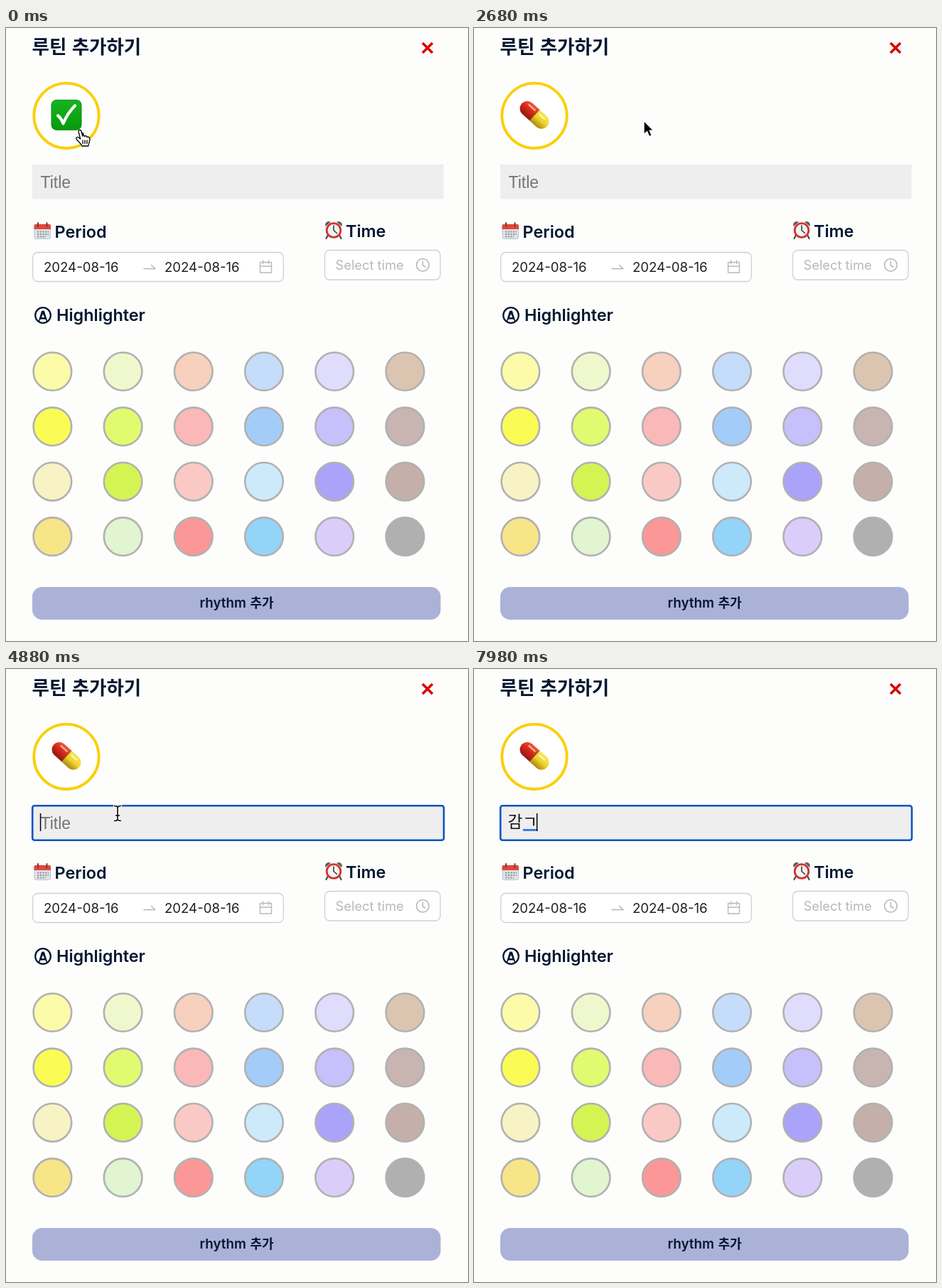
An HTML page for the animation above (8000 ms loop, 650 px wide and 862 px high).

```html
<!DOCTYPE html>
<html lang="ko">
<head>
<meta charset="utf-8">
<title>루틴 추가하기</title>
<style>
  html, body { margin: 0; width: 100%; height: 100%; overflow: hidden; background: #fdfdfc; }
  svg { display: block; width: 100vw; height: 100vh; }
  .ko { font-family: "Noto Sans CJK KR", "Noto Sans CJK", sans-serif; }
  .ui { font-family: Inter, sans-serif; }
  .in { font-family: "Liberation Sans", Arial, sans-serif; }
  .head { font-size: 23.4px; font-weight: 600; fill: #021730; }
  .line { fill: none; stroke-linecap: round; stroke-linejoin: round; }
</style>
</head>
<body>
<svg viewBox="0 0 650 862" xmlns="http://www.w3.org/2000/svg">
  <defs>
    <linearGradient id="green" x2="0" y2="1">
      <stop stop-color="#16b51d"/><stop offset="1" stop-color="#079a0d"/>
    </linearGradient>
    <linearGradient id="red" x2="0" y2="1">
      <stop stop-color="#f0593c"/><stop offset=".45" stop-color="#d92a1c"/><stop offset="1" stop-color="#8e1710"/>
    </linearGradient>
    <linearGradient id="yellow" x2="0" y2="1">
      <stop stop-color="#f8e456"/><stop offset=".5" stop-color="#efd42c"/><stop offset="1" stop-color="#a98712"/>
    </linearGradient>
    <linearGradient id="skin" x2="0" y2="1">
      <stop stop-color="#ffc93c"/><stop offset="1" stop-color="#e89a1c"/>
    </linearGradient>
    <linearGradient id="pale" x2="0" y2="1">
      <stop stop-color="#fbdfcd"/><stop offset="1" stop-color="#eebfa6"/>
    </linearGradient>
    <clipPath id="bar"><rect x="155" y="94" width="403" height="58" rx="20"/></clipPath>

    <!-- Icons are centred on 0,0 and about 42 wide -->
    <g id="check">
      <rect x="-21" y="-21" width="42" height="42" rx="7" fill="url(#green)" stroke="#078a0c"/>
      <path d="M-12 1C-8 4-6 8-4.5 12C0 1 5-6 12-13" class="line" stroke="#fff" stroke-width="4.2"/>
    </g>
    <g id="pill" transform="rotate(42)">
      <path d="M0-10.5H-13.5a10.5 10.5 0 0 0 0 21H0z" fill="url(#red)"/>
      <path d="M0-10.5H13.5a10.5 10.5 0 0 1 0 21H0z" fill="url(#yellow)"/>
      <path d="M0-10.5V10.5" stroke="#7d4a10" stroke-width="1"/>
      <path d="M-15-5.5H-4" class="line" stroke="#ffb09c" stroke-width="2.4"/>
      <path d="M5-5.5H14" class="line" stroke="#fff8b8" stroke-width="2.4"/>
    </g>
    <g id="arm">
      <path d="M-16-18C-12-22-3-20-2-16C-1-11-7-9-9-10C-8-5-7-1-6 2C1-4 13-3 18 4C21 9 21 15 18 19C8 22-8 22-19 17C-21 5-20-9-16-18Z"
        fill="url(#skin)" stroke="#cf8614" stroke-width="1.2"/>
      <path d="M-6 2C-7 6-9 8-12 9M-9-10L-13-12M-2 12C4 15 9 13 11 9" class="line" stroke="#b97210" stroke-width="1.5"/>
    </g>
    <g id="book">
      <path d="M-20-13L-1-11H1L20-13V15L1 17H-1L-20 15Z" fill="#3e6480"/>
      <path d="M0-11C-5-17-13-17-18-15V12C-12 10-4 11 0 15C4 11 12 10 18 12V-15C13-17 5-17 0-11Z" fill="#f7f6f0" stroke="#a6a69e"/>
      <path d="M0-11V15" stroke="#8b8b84" stroke-width="1.8"/>
      <path d="M-14-9L-5-7M-14-4L-5-2M-14 1L-5 3M-14 6L-5 8M5-7L14-9M5-2L14-4M5 3L14 1M5 8L14 6" class="line" stroke="#8f9094" stroke-width="1.6"/>
    </g>
    <path id="star" d="M0-20L6-6L21-5L9.5 4.500L13 19L0 11L-13 19L-9.500 4.500L-21-5L-6-6Z"
      fill="#fcc83a" stroke="#e9a51f" stroke-width="1.5" stroke-linejoin="round"/>
    <g id="thumb">
      <path d="M-19 2C-12 1-7-5-4-11C-2-16-2-20 1-20C6-20 6-13 4-4H14C19-4 20 1 17 3C20 5 19 9 16 10C18 13 16 16 13 16C14 19 11 21 8 21H-4C-10 21-14 18-19 17Z"
        fill="url(#pale)" stroke="#d9a68c" stroke-width="1.2"/>
      <path d="M6 3H17M6 10H16M5 16H13M4-4C1-3-1-1-1 2" class="line" stroke="#cf9a82" stroke-width="1.3"/>
    </g>
    <g id="face">
      <circle r="20" fill="#fccb32" stroke="#e9a31d"/>
      <path d="M-12-5Q-8.500-11-5-5M5-5Q8.500-11 12-5" class="line" stroke="#6b3d0e" stroke-width="2.4"/>
      <path d="M-13 3C-8 10 7 11 13 3C13 13 7 17 0 17S-13 12-13 3Z" fill="#7a2b12"/>
      <path d="M2 9C5 5 13 4 15 9S10 18 6 16Z" fill="#f0566a"/>
      <circle cx="-14" cy="3" r="3" fill="#f59a3a"/><circle cx="14" cy="2" r="3" fill="#f59a3a"/>
    </g>
  </defs>

  <rect width="650" height="862" fill="#fdfdfc"/>
  <text class="ko" x="36.500" y="36" font-size="26.500" font-weight="800" fill="#021730">루틴 추가하기</text>
  <path d="M586 21L600 35M600 21L586 35" stroke="#dc0606" stroke-width="3.600"/>

  <circle cx="85" cy="123.300" r="45.700" fill="#fff" stroke="#fbcf07" stroke-width="3.800"/>
  <use id="chosen" href="#check" transform="translate(85 122.300)"/>

  <g id="popup">
    <path d="M141 123L156 109V137Z" fill="#d7d7d7"/>
    <g clip-path="url(#bar)">
      <rect x="155" y="94" width="403" height="58" fill="#d7d7d7"/>
      <rect x="155" y="94" width="57.600" height="58" fill="#e8b6dd"/>
      <rect id="hover" x="212.400" y="94" width="57.600" height="58" fill="#e8b6dd"/>
    </g>
    <g id="choices"></g>
  </g>

  <rect x="37" y="192" width="578.500" height="48.500" fill="#eeeeee"/>
  <rect id="focus" x="37.200" y="192.200" width="578.800" height="48.600" rx="3" fill="none" stroke="#0d55c0" stroke-width="2.600"/>
  <text id="hint" class="in" x="48.500" y="224.500" font-size="23" fill="#757575">Title</text>
  <text id="typed" class="ko" x="47.500" y="223" font-size="22.500" font-weight="350" fill="#111"></text>
  <rect id="under" y="225" width="20.500" height="2.800" fill="#2f78ea"/>
  <rect id="caret" y="203" width="1.500" height="25" fill="#000"/>

  <!-- Period -->
  <g>
    <rect x="40" y="276" width="22.500" height="20.500" rx="2" fill="#dfe3e7" stroke="#b3bac1" stroke-width=".8"/>
    <path d="M39.500 283V278Q39.500 276 42 276H60.500Q63 276 63 278V283Z" fill="#e0473b"/>
    <path d="M45 274V279M57.500 274V279" stroke="#8b3430" stroke-width="2" stroke-linecap="round"/>
    <path d="M44 286.500H60M44 290H60M44 293.500H56" stroke="#8b949c" stroke-width="2" stroke-dasharray="2.200 1.500"/>
  </g>
  <text class="ui head" x="68.500" y="295">Period</text>
  <rect x="37.700" y="315.500" width="352.600" height="41" rx="7" fill="#fff" stroke="#cfcfda" stroke-width="1.300"/>
  <g class="ui" font-size="18.600" fill="#1f1f1f">
    <text x="53" y="343">2024-08-16</text>
    <text x="223" y="343">2024-08-16</text>
  </g>
  <path d="M194 338.500H210L204.500 333.500" class="line" stroke="#b5b5b5" stroke-width="1.400"/>
  <path d="M357.500 329.500H373.500V344H357.500ZM357.500 335H373.500M361.500 327V331.500M369.500 327V331.500" class="line" stroke="#b9b9b9" stroke-width="1.400"/>

  <!-- Time -->
  <g>
    <path d="M453 291L450.500 296M469 291L471.500 296" class="line" stroke="#4a4c50" stroke-width="2.200"/>
    <path d="M449.500 279C448 274 452 270.500 457 272.500ZM472.500 279C474 274 470 270.500 465 272.500Z" fill="#555b61"/>
    <circle cx="461" cy="284.500" r="9.800" fill="#eff3f2" stroke="#d2342f" stroke-width="2.800"/>
    <path d="M461 278V284.500L465.500 288.500" class="line" stroke="#333" stroke-width="1.500"/>
  </g>
  <text class="ui head" x="478" y="294">Time</text>
  <rect x="448.500" y="312.500" width="162.500" height="41.500" rx="7" fill="#fff" stroke="#cfcfda" stroke-width="1.300"/>
  <text class="ui" x="463.500" y="340" font-size="18.300" fill="#b9b9b9">Select time</text>
  <g class="line" stroke="#b5b5b5" stroke-width="1.500">
    <circle cx="586.300" cy="333.300" r="8.800"/><path d="M586.300 328V334L590 336"/>
  </g>

  <!-- Highlighter -->
  <circle cx="52" cy="404" r="10.800" fill="none" stroke="#021730" stroke-width="2.200"/>
  <path d="M46 413L50.500 398H53.500L58 413L55.500 409H48.500Z" fill="#021730" stroke="#021730" stroke-linejoin="round"/>
  <path d="M52 402L54 407H50Z" fill="#fdfdfc"/>
  <text class="ui head" x="71" y="412">Highlighter</text>
  <g id="swatches" stroke="#b1b1b1" stroke-width="2.600"></g>

  <rect x="37" y="786" width="574.500" height="46" rx="14" fill="#abb2d7"/>
  <text class="ui" x="272.500" y="815" font-size="18.800" font-weight="600" fill="#021730">rhythm</text>
  <text class="ko" x="343.500" y="815" font-size="18" font-weight="700" fill="#021730">추가</text>

  <!-- Pointers, each with its hot spot at 0,0 -->
  <g id="hand" stroke="#000" stroke-width="1.300" stroke-linejoin="round" stroke-linecap="round">
    <path d="M-2 2.500C-2.500 0 1.500-.3 2.200 2.500L3.700 9C4-.5 4 7 6.300 9.500C7.500 8 9.500 8.500 10 10.500C11.500 9.500 13.800 10.500 13.800 13C14.200 17 12.300 18.500 11.800 23H3C2.500 20.500-2 17-4.800 13.500C-6.500 11-3.500 9.500-1.500 11.200L.6 13Z" fill="#fff"/>
    <path d="M4 15V19.500M7 15V19.500M10 15V19.500" fill="none"/>
  </g>
  <path id="arrow" d="M-.5-.5V18.500L4 14.500L7 21.500L10.500 20L7.500 13.200H13Z" fill="#000" stroke="#fff" stroke-width="1.200"/>
  <g id="beam" class="line">
    <path id="stem" d="M-4.500-10.500Q0-10.500 0-7.500Q0-10.500 4.500-10.500M0-7.500V7.500M-4.500 10.500Q0 10.500 0 7.500Q0 10.500 4.500 10.500M-2.500 3H2.500" stroke="#fff" stroke-width="3.400"/>
    <use href="#stem" style="stroke:#000"/>
    <path d="M-4.500-10.500Q0-10.500 0-7.500Q0-10.500 4.500-10.500M0-7.500V7.500M-4.500 10.500Q0 10.500 0 7.500Q0 10.500 4.500 10.500M-2.500 3H2.500" stroke="#000" stroke-width="1.600"/>
  </g>
</svg>
<script>
const LOOP = 8000, OPEN = 480, PICK = 2000, FOCUS = 3800;
const $ = id => document.getElementById(id);
const show = (id, on) => $(id).setAttribute('display', on ? 'inline' : 'none');

const colors = [
  'fbfba9 eff8cd f7d0be c5dcfa dfdcfc dcc5b0',
  'fbfb55 e0fb70 fbb8b8 a3ccf9 c6c0fb c8b5b1',
  'f7f3c4 d4f454 fbc9c5 cdeafa a9a3fa c4b0a9',
  'f7e588 e0f5d0 fb9797 94d4f8 dacdfa b0b0b0'
];
$('swatches').innerHTML = colors.map((row, j) => row.split(' ').map((c, i) =>
  `<circle cx="${65.400 + 99.200 * i}" cy="${483 + 77.400 * j}" r="26.800" fill="#${c}"/>`).join('')).join('');

$('choices').innerHTML = ['check', 'pill', 'arm', 'book', 'star', 'thumb', 'face'].map((name, i) =>
  `<use href="#${name}" transform="translate(${183.300 + 57.600 * i} 123) scale(.65)"/>`).join('');

// Pointer stops: time, x, y
const path = [
  [0, 104, 143], [650, 104, 143], [1250, 238.500, 132], [2680, 239.500, 131],
  [2850, 239.500, 131], [3340, 179, 195], [3420, 179, 195], [3720, 157, 203], [LOOP, 157, 203]
];
// Key presses: time, finished text, syllable being composed
const keys = [
  [0, '', ''], [5800, '', 'ㄱ'], [6150, '', '개'], [6750, '', 'ㄱ'],
  [7050, '', '가'], [7350, '', '감'], [7700, '감', 'ㄱ']
];
const ease = u => u * u * (3 - 2 * u);

function pointer(t) {
  const k = path.findIndex(p => p[0] > t);
  const [t0, x0, y0] = path[k - 1], [t1, x1, y1] = path[k];
  const u = ease((t - t0) / (t1 - t0));
  return [x0 + (x1 - x0) * u, y0 + (y1 - y0) * u];
}

function draw(t) {
  const [x, y] = pointer(t);
  const open = t >= OPEN && t < PICK;
  const [pressed, done, part] = keys.filter(k => k[0] <= t).pop();
  const typing = pressed > 0;

  show('popup', open);
  show('hover', open && x > 212);
  $('chosen').setAttribute('href', t < PICK ? '#check' : '#pill');

  const overBar = open && x > 150;
  const overRing = Math.hypot(x - 85, y - 123) < 48;
  const hand = overBar || overRing;
  const beam = !hand && y > 191;
  show('hand', hand);
  show('beam', beam && !typing);
  show('arrow', !hand && !beam);
  for (const id of ['hand', 'beam', 'arrow']) $(id).setAttribute('transform', `translate(${x} ${y})`);

  const end = 47.500 + 20.700 * (done + part).length;
  show('focus', t >= FOCUS);
  show('hint', !typing);
  $('typed').textContent = done + part;
  show('under', part);
  $('under').setAttribute('x', end - 20);
  show('caret', t >= FOCUS && Math.floor((t - (pressed || FOCUS)) / 500) % 2 === 0);
  $('caret').setAttribute('x', typing ? end - 1 : 47.800);
}

function tick() {
  draw(performance.now() % LOOP);
  requestAnimationFrame(tick);
}
tick();
</script>
</body>
</html>
```
